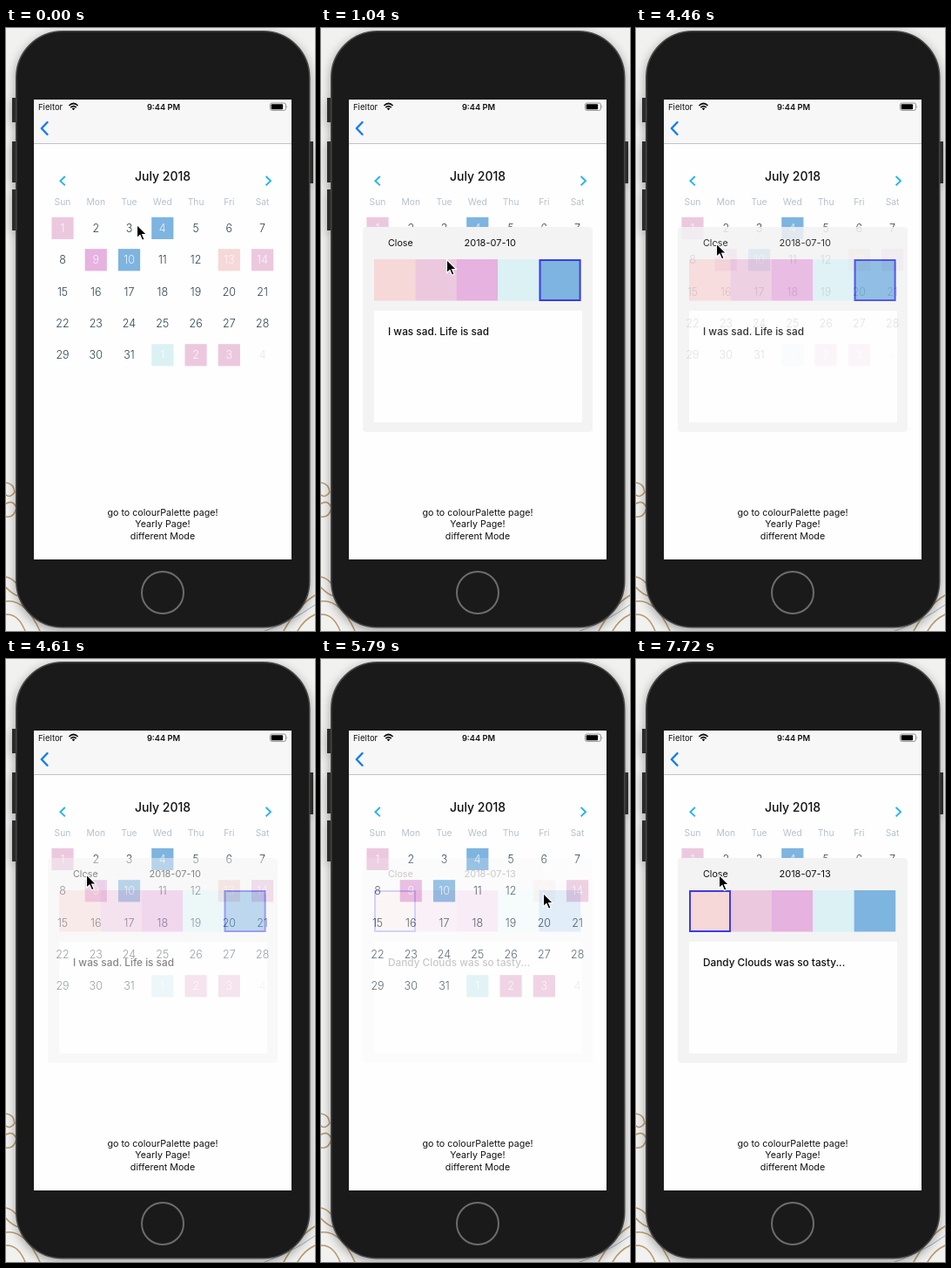
An HTML page that plays this animation: 355 by 691 pixels, repeating every 8000 ms.

```html
<!DOCTYPE html>
<html lang="en">
<head>
<meta charset="utf-8">
<title>Mood calendar</title>
<style>
  html, body { margin: 0; width: 100%; height: 100%; overflow: hidden; background: #f1f1f0; }
  svg { display: block; }
  text { font-family: Inter, Roboto, sans-serif; font-size: 10.7px; fill: #111; }
  .mid { text-anchor: middle; }
  .line { fill: none; stroke-linecap: round; stroke-linejoin: round; }
  .title { font-size: 14px; font-weight: 500; }
  .week { font-size: 10.3px; fill: #b6c1cd; }
  .day { font-size: 12.5px; font-weight: 300; fill: #2d4150; }
  .note { font-size: 11.8px; font-weight: 500; }
  #phone { filter: drop-shadow(0 3px 6px rgba(0, 0, 0, .35)); }
</style>
</head>
<body>
<svg width="355" height="691" viewBox="0 0 355 691">
  <rect width="355" height="691" fill="#f1f1f0"/>
  <!-- floral wallpaper -->
  <g class="line" stroke="#b79a6c" stroke-width="1.6">
    <path d="M0 521Q9 522 10 532Q5 539 0 535M0 545Q8 540 12 550Q9 562 0 560"/>
    <path d="M0 629Q14 632 18 652Q8 650 0 641M0 657Q22 654 39 691M0 672Q14 671 22 691"/>
    <path d="M355 650Q335 662 319 691M355 672Q342 678 335 691"/>
    <path d="M297 691Q325 682 355 661" stroke="#9fabb5" stroke-width="1"/>
  </g>
  <g id="phone">
    <path d="M7 80h6v28h-6zM7 130h6v47h-6zM7 185h6v47h-6zM347 130h6v48h-6z" fill="#2b2b2b"/>
    <rect x="11.8" y="3.8" width="336.9" height="683" rx="53" fill="#1a1a1a" stroke="#444" stroke-width="1.6"/>
  </g>
  <circle cx="180" cy="647" r="24" fill="none" stroke="#6c6c6c" stroke-width="2"/>

  <rect x="32" y="82" width="296" height="527" fill="#fefefe"/>
  <rect x="32" y="82" width="296" height="50" fill="#f7f7f7"/>
  <rect x="32" y="132" width="296" height="1" fill="#c4c4c4"/>
  <text x="37" y="93.7" font-size="9.5" style="font-size:9.5px">Fieltor</text>
  <g class="line" stroke="#111" stroke-width="1.7" style="stroke-linecap:butt">
    <path d="M72.4 89Q77.5 84 82.6 89M74.3 91.2Q77.5 88.2 80.7 91.2"/>
  </g>
  <path d="M75.7 92.2Q77.5 90.7 79.3 92.2L77.5 94.2Z"/>
  <text class="mid" x="181" y="93.7" style="font-size:9.3px;font-weight:600">9:44 PM</text>
  <rect x="303.5" y="86" width="18" height="8.4" rx="2" fill="none" stroke="#888" stroke-width=".9"/>
  <rect x="304.7" y="87.2" width="13.4" height="6" rx="1"/>
  <path d="M322.7 88.7q1.5 1.5 0 3z" fill="#888"/>
  <path class="line" d="M47.5 108L40.8 115L47.5 122" stroke="#127cf5" stroke-width="2.4"/>

  <g class="line" stroke="#25b4ee" stroke-width="1.9" style="stroke-linecap:butt;stroke-linejoin:miter">
    <path d="M67.8 170L62.4 175.2L67.8 180.4M298.6 170L304 175.2L298.6 180.4"/>
  </g>
  <text class="mid title" x="180" y="175">July 2018</text>
  <g id="calendar"></g>
  <text class="mid" x="180" y="558.8">go to colourPalette page!</text>
  <text class="mid" x="180" y="572.3">Yearly Page!</text>
  <text class="mid" x="180" y="585.8">different Mode</text>

  <g id="popup">
    <rect x="48" y="228" width="264" height="235" rx="4" fill="#f3f3f3"/>
    <text x="77" y="250.3">Close</text>
    <text id="date" x="164.5" y="250.3" style="font-size:11px"></text>
    <g id="swatches"></g>
    <rect id="chosen" y="266" width="46" height="46" fill="none" stroke="#3c3ce6" stroke-width="2"/>
    <rect x="61" y="324" width="239" height="128" fill="#fefefe"/>
    <text id="note" class="note" x="77" y="352.3"></text>
  </g>
  <path id="cursor" d="M0 0V15.2L3.5 12L6 17.8L8.6 16.7L6.1 11H11Z" stroke="#fff" stroke-width="1.1"/>
</svg>
<script>
const $ = id => document.getElementById(id);
const peach = '#f6d8d8', pink = '#ecc8df', orchid = '#e6b2df', mint = '#dbf1f4', blue = '#7eb4e0';
const palette = [peach, pink, orchid, mint, blue];
// Moods by position in the five week grid, which starts on 1 July
const moods = { 1: pink, 4: blue, 9: orchid, 10: blue, 13: peach, 14: pink, 32: mint, 33: pink, 34: pink };

function add(parent, tag, attrs, text = '') {
  const el = document.createElementNS('http://www.w3.org/2000/svg', tag);
  for (const name in attrs) el.setAttribute(name, attrs[name]);
  el.textContent = text;
  return parent.appendChild(el);
}

const colX = col => 65 + 38.27 * col;
['Sun', 'Mon', 'Tue', 'Wed', 'Thu', 'Fri', 'Sat'].forEach((name, col) =>
  add($('calendar'), 'text', { class: 'mid week', x: colX(col), y: 203 }, name));

const cells = {};
for (let n = 1; n <= 35; n++) {
  const x = colX((n - 1) % 7), y = 229.4 + 36.35 * Math.floor((n - 1) / 7);
  const cell = cells[n] = add($('calendar'), 'g', {});
  if (moods[n]) add(cell, 'rect', { x: x - 12.6, y: y - 12.6, width: 25.2, height: 25.2, fill: moods[n] });
  const label = add(cell, 'text', { class: 'mid day', x, y: y + 4.5 }, n > 31 ? n - 31 : n);
  if (moods[n]) label.style.fill = 'rgba(255,255,255,.85)';
  else if (n > 31) label.style.fill = '#e3e8ed';
}

palette.forEach((fill, i) =>
  add($('swatches'), 'rect', { x: 61 + 47.4 * i, y: 265, width: 47.6, height: 47.5, fill }));

const entries = {
  10: { date: '2018-07-10', note: 'I was sad. Life is sad', swatch: 4 },
  13: { date: '2018-07-13', note: 'Dandy Clouds was so tasty...', swatch: 0 }
};

// Held states: time, cursor x, cursor y, popup opacity, pressed day
const steps = [
  [0, 150.5, 225.5, 0],
  [150, 156, 238, 0], [300, 152, 254, 0], [450, 145, 265, 0], [600, 144.5, 265.5, 0, 10],
  [890, 144.5, 265.5, .5, 10], [1040, 144.5, 265.5, 1],
  [2240, 135, 262, 1], [2390, 112, 253, 1], [2530, 97, 248, 1], [2670, 92, 246.5, 1],
  [2970, 92.5, 247, 1],
  [4460, 92.5, 247, .85], [4610, 92.5, 247, .5], [4750, 92.5, 247, .12],
  [4900, 112, 250, 0], [5050, 165, 258, 0], [5200, 222, 265, 0], [5350, 250, 268, 0],
  [5500, 255.5, 268.5, 0, 13],
  [5650, 255.5, 268.5, .04, 13], [5790, 255.5, 268.5, .22, 13],
  [5940, 255.5, 268.5, .7, 13], [6090, 255.5, 268.5, 1],
  [6990, 250, 268.5, 1], [7130, 127.5, 249.5, 1],
  [7430, 115, 249, 1], [7570, 100, 247.5, 1], [7720, 95.5, 247.5, 1]
];

function draw(now) {
  const time = now % 8000;
  const [, x, y, opacity, pressed] = steps.findLast(step => step[0] <= time);
  const entry = entries[time < 5000 ? 10 : 13];
  $('cursor').setAttribute('transform', `translate(${x} ${y})`);
  $('popup').setAttribute('opacity', opacity);
  $('date').textContent = entry.date;
  $('note').textContent = entry.note;
  $('chosen').setAttribute('x', 62 + 47.4 * entry.swatch);
  for (const day in entries) cells[day].setAttribute('opacity', day == pressed ? .2 : 1);
}

const start = performance.now();
function tick() {
  draw(performance.now() - start);
  requestAnimationFrame(tick);
}
tick();
</script>
</body>
</html>
```
